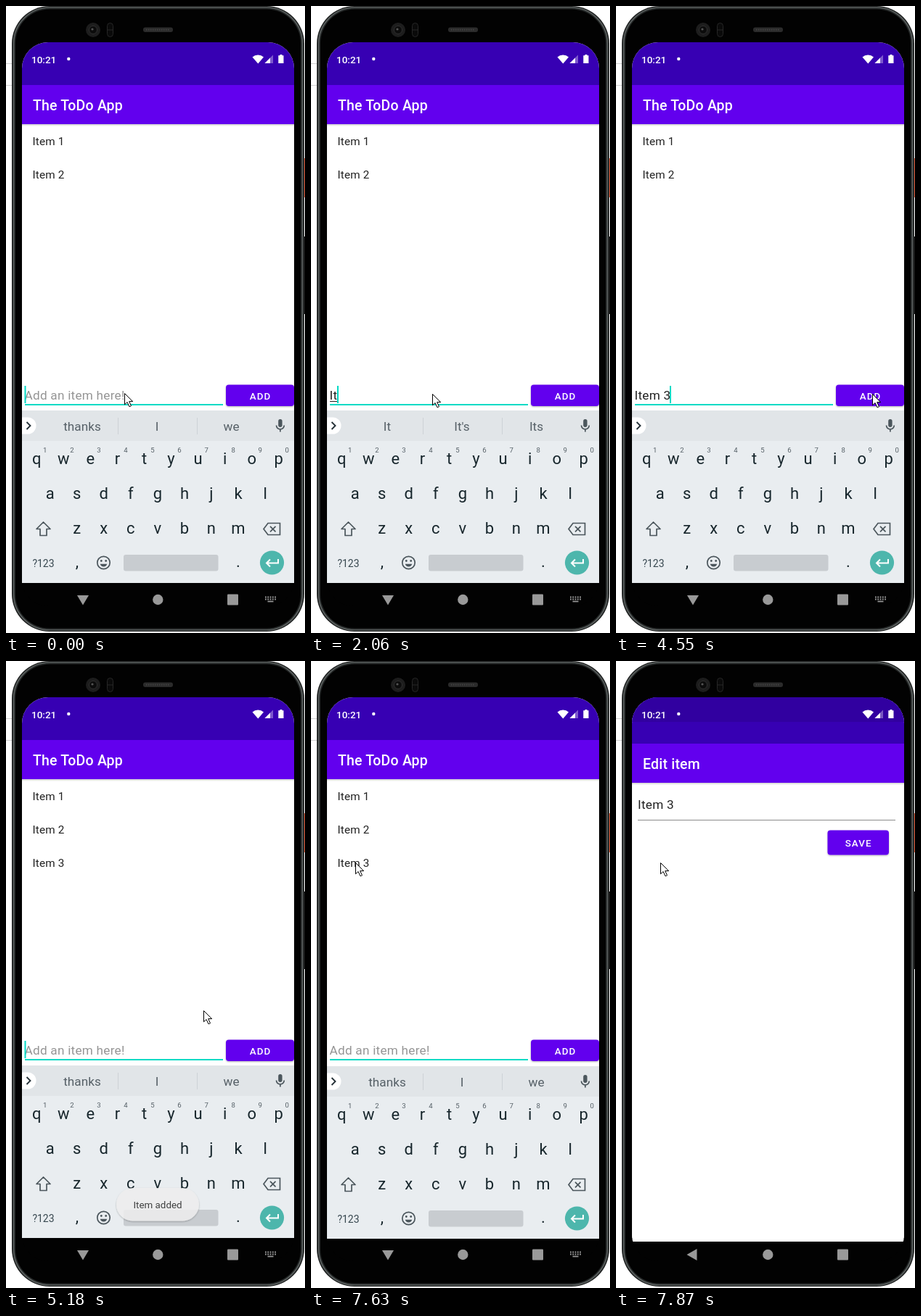
Animation, 412 px wide and 865 px high, one loop 7.99 s. Source, as an HTML page:

```html
<!DOCTYPE html>
<html lang="en">
<head>
<meta charset="utf-8">
<title>The ToDo App</title>
<style>
html, body { margin: 0; width: 100%; height: 100%; overflow: hidden; background: #fff; }
svg { display: block; width: 412px; height: 865px; font-family: Roboto, "Open Sans", sans-serif; }
text { white-space: pre; }
.mid { text-anchor: middle; }
.title { font-size: 19.5px; font-weight: 500; letter-spacing: .2px; fill: #fff; }
.item { font-size: 15.3px; letter-spacing: .15px; fill: #212121; }
.field { font-size: 17.2px; letter-spacing: .24px; fill: #212121; }
.btn { font-size: 13.4px; font-weight: 500; letter-spacing: 1.1px; fill: #fff; text-anchor: middle; }
.word { font-size: 17.2px; fill: #566067; text-anchor: middle; }
.key { font-size: 22px; fill: #17262c; text-anchor: middle; }
.num { font-size: 9.6px; fill: #566067; text-anchor: middle; }
.icon { fill: none; stroke: #4b565c; stroke-width: 1.7; }
</style>
</head>
<body>
<svg viewBox="0 0 412 865">
  <defs>
    <clipPath id="screen"><rect x="22" y="50" width="375" height="778" rx="36"/></clipPath>
    <clipPath id="board"><rect x="22" y="500" width="375" height="297"/></clipPath>
    <linearGradient id="shade" x2="0" y2="1">
      <stop offset="0" stop-color="#000" stop-opacity=".26"/>
      <stop offset="1" stop-color="#000" stop-opacity="0"/>
    </linearGradient>
    <filter id="soft" x="-20%" y="-30%" width="140%" height="170%">
      <feDropShadow dx="0" dy="1" stdDeviation=".8" flood-opacity=".3"/>
    </filter>
  </defs>

  <!-- phone -->
  <path d="M0 79.5H8M0 109.5H8" stroke="#d2d2d2"/>
  <rect x="408" y="210" width="4" height="54" fill="#e8623f"/>
  <rect x="408" y="318" width="4" height="107" fill="#161616"/>
  <rect x="8" y="0" width="403" height="863" rx="52" fill="#1b1d1d"/>
  <rect x="10.500" y="2" width="398" height="859" rx="50" fill="#242727" stroke="#5a5f5e" stroke-width="1.700"/>
  <rect x="13" y="4.500" width="393" height="854" rx="47" fill="#020202"/>
  <circle cx="120" cy="33" r="10" fill="#1d1d1d"/>
  <circle cx="120" cy="33" r="5.5" fill="#0c0c0c" stroke="#303030"/>
  <circle cx="119" cy="32" r="1.6" fill="#555"/>
  <rect x="139.500" y="23.500" width="8" height="19" rx="4" fill="#0a0a0a" stroke="#262626"/>
  <path d="M140 33h7" stroke="#262626"/>
  <rect x="189" y="29.500" width="41" height="6.500" rx="3" fill="#2b2b2b"/>
  <path d="M193 32.700h33" stroke="#414141" stroke-width="2" stroke-dasharray="1.500 1.500"/>

  <g clip-path="url(#screen)">
    <rect x="22" y="50" width="375" height="746" fill="#fff"/>
    <rect x="22" y="50" width="375" height="60" fill="#3700b3"/>
    <rect x="22" y="162" width="375" height="4" fill="url(#shade)"/>
    <rect x="22" y="109" width="375" height="54" fill="#6200ee"/>
    <text class="title" x="37" y="143.500">The ToDo App</text>
    <text class="item" x="36.500" y="191.500">Item 1</text>
    <text class="item" x="36.500" y="237.500">Item 2</text>
    <text class="item" x="36.500" y="283.500" id="third">Item 3</text>

    <text class="field" id="typed" x="25.500" y="543"></text>
    <rect id="compose" x="26" y="545" height="1" fill="#212121"/>
    <rect x="26" y="549" width="273" height="2" fill="#03dac5"/>
    <rect id="caret" y="524" width="2" height="24" fill="#03dac5"/>
    <rect id="add" x="303" y="522.500" width="94" height="29.500" rx="4" filter="url(#soft)"/>
    <text class="btn" x="350.600" y="542.700">ADD</text>
  </g>

  <g clip-path="url(#board)">
    <g id="keyboard">
      <rect x="22" y="558" width="375" height="238" fill="#e9edf0"/>
      <rect x="22" y="558" width="375" height="42" fill="#e1e5e8"/>
      <rect x="10" y="567.500" width="31.500" height="23" rx="11.500" fill="#fff"/>
      <path d="M28.500 574l5 5-5 5" fill="none" stroke="#263238" stroke-width="1.900"/>
      <g id="words">
        <path d="M154.500 568v23M263.500 568v23" stroke="#cdd2d6"/>
        <text class="word" x="105" y="586"></text>
        <text class="word" x="208" y="586"></text>
        <text class="word" x="310.500" y="586"></text>
      </g>
      <rect x="375.200" y="570" width="5.400" height="11" rx="2.700" fill="#4b565c"/>
      <path class="icon" d="M372.500 578.500a5.400 5.400 0 0 0 10.800 0M377.900 584v3.500"/>
      <g id="keys"></g>
      <path class="icon" d="M51.500 712l-9.500 9.500h5v9h9v-9h5z" stroke-linejoin="round"/>
      <path class="icon" d="M361 713.500h16.500v16H361l-6-8zM364 717.800l7.500 7.500m0-7.500l-7.500 7.500"/>
      <text x="51.500" y="773.500" class="mid" font-size="14" fill="#37474f">?123</text>
      <circle class="icon" cx="134.500" cy="768" r="8.700"/>
      <path d="M129.700 769.800h9.600a5 5 0 0 1-9.600 0z" fill="#4b565c"/>
      <circle cx="131.300" cy="765.500" r="1.400" fill="#4b565c"/>
      <circle cx="137.700" cy="765.500" r="1.400" fill="#4b565c"/>
      <rect x="162" y="757" width="130.500" height="22.500" rx="3" fill="#c8ccd0"/>
      <circle cx="366.500" cy="768" r="16.600" fill="#4db6ac"/>
      <path d="M375 763v5.500H359m5-5l-5 5 5 5" fill="none" stroke="#fff" stroke-width="2"/>
    </g>
    <g id="toast">
      <rect x="152" y="727" width="114" height="45.500" rx="22.700" fill="#eee" filter="url(#soft)"/>
      <text class="mid" x="209" y="755" font-size="13.400" fill="#222">Item added</text>
    </g>
  </g>

  <g clip-path="url(#screen)">
    <rect id="floor" x="22" y="796" width="375" height="60" fill="#020202"/>
    <g id="edit">
      <rect x="22" y="50" width="375" height="746" fill="#fff"/>
      <rect x="22" y="40" width="375" height="70" fill="#3700b3"/>
      <rect x="22" y="40" width="375" height="39" fill="#3100a0"/>
      <rect x="22" y="162" width="375" height="4" fill="url(#shade)"/>
      <rect x="22" y="109" width="375" height="54" fill="#6200ee"/>
      <text class="title" x="37" y="144">Edit item</text>
      <text class="field" x="30" y="199">Item 3</text>
      <path d="M30 214.500H385" stroke="#8c8c8c"/>
      <rect x="291.500" y="228.500" width="84.500" height="34" rx="4" fill="#6200ee" filter="url(#soft)"/>
      <text class="btn" x="334.200" y="250.700">SAVE</text>
    </g>
    <text x="35" y="78.500" font-size="13.500" font-weight="500" fill="#fff">10:21</text>
    <circle cx="86.300" cy="73" r="2.200" fill="#fff"/>
    <path d="M339.500 70.500a11.500 11.500 0 0 1 15.500 0l-7.700 9z" fill="#fff"/>
    <path d="M368 67.500v11.500h-11.500z" fill="#fff" opacity=".35"/>
    <path d="M364 71.500v7.500h-7.500z" fill="#fff"/>
    <path d="M377.500 67h3v1.300h2V79h-7.200V68.300h2.200z" fill="#fff"/>
  </g>

  <g fill="#999">
    <path id="down" d="M98 813h16l-8 13.500z"/>
    <path id="back" d="M97.500 819l14-8v16z"/>
    <circle cx="209.300" cy="819" r="7.200"/>
    <rect x="305" y="811.500" width="15" height="15" rx="1"/>
    <g id="switch">
      <path d="M357 815.500h15M357 818.500h15" stroke="#999" stroke-width="2" stroke-dasharray="1.800 1.500"/>
      <path d="M360.500 821.500h8" stroke="#999" stroke-width="1.700"/>
    </g>
  </g>
  <path id="mouse" d="M.5.500v15.300l3.600-3.300 2.900 6.300 2.500-1.100-2.800-6.100h5z" fill="#fff" stroke="#000"/>
</svg>
<script>
const LOOP = 7990;
const $ = id => document.getElementById(id);
const words = [...document.querySelectorAll('#words text')];
const HINT = 'Add an item here!';
const IDLE = ['thanks', 'I', 'we'];

// Each track is a list of [time, value], held until the next entry.
const mouse = [
  [0, [163, 534]], [870, [164, 534]], [1020, [166, 535]], [1140, [167, 535]],
  [3700, [192, 548]], [3820, [240, 564]], [3940, [298, 571]], [4060, [341, 550]], [4180, [353, 535]],
  [4910, [340, 533]], [5030, [282, 513]], [5180, [272, 482]], [5300, [267, 466]], [5430, [266, 459]],
  [6660, [88, 370]], [6790, [84, 356]], [6950, [65, 298]], [7240, [61, 278]]
];
// text, caret x, composing, suggestions
const typing = [
  [0, ['', 25.5, false, IDLE]],
  [1760, ['I', 30, true, ['I', "I'm", "I'll"]]],
  [2060, ['It', 36, true, ['It', "It's", 'Its']]],
  [2210, ['Ite', 45, true, ['Item', 'Ite', 'Items']]],
  [2340, ['Item', 60, true, ['Item', 'Items', 'Itemized']]],
  [2960, ['Item ', 64.5, false, ['and', 'is', 'I']]],
  [3580, ['Item 3', 74, false, null]],
  [4790, ['', 25.5, false, IDLE]]
];
const caret = [
  [0, 1], [250, 0], [750, 1], [1140, 0], [1640, 1], [3460, 0], [3580, 1], [4060, 0], [4550, 1],
  [5300, 0], [5710, 1], [6210, 0], [6790, 1], [7100, 0]
];
const toast = [
  [0, 0], [4910, .3], [5030, .65], [5180, .85], [5300, .95], [5430, 1],
  [6790, .7], [6950, .35], [7100, .06], [7240, 0]
];
const press = [[0, '#6200ee'], [4670, '#7c2bf1'], [4910, '#6f18ef'], [5030, '#6200ee']];
// keyboard drop, edit screen offset, edit screen opacity
const swap = [[0, [0, 0, 0]], [7630, [1, 0, 0]], [7750, [24, 26, .6]], [7870, [238, 5, 1]]];

function at(track, t) {
  let value = track[0][1];
  for (const [start, v] of track) if (t >= start) value = v;
  return value;
}

function set(id, attrs) {
  for (const name in attrs) $(id).setAttribute(name, attrs[name]);
}

const show = (id, on) => set(id, { opacity: +on });
const move = (id, x, y) => set(id, { transform: `translate(${x} ${y})` });

function buildKeys() {
  const key = (c, x, y, kind = 'key') => `<text class="${kind}" x="${x}" y="${y}">${c}</text>`;
  const row = (chars, x, y, kind) => [...chars].map((c, i) => key(c, x + i * 37.05, y, kind)).join('');
  $('keys').innerHTML = row('qwertyuiop', 42.3, 631.5) + row('1234567890', 53.8, 616, 'num') +
    row('asdfghjkl', 60.7, 679.5) + row('zxcvbnm', 97.7, 727.5) +
    key(',', 98, 774) + key('.', 320, 774);
}

function draw(t) {
  const [text, caretX, composing, tips] = at(typing, t);
  const typed = $('typed');
  typed.textContent = text || HINT;
  typed.style.fill = text ? '#212121' : '#959595';
  set('compose', { width: composing ? caretX - 26 : 0 });
  set('caret', { x: caretX, opacity: at(caret, t) });
  show('words', !!tips);
  if (tips) words.forEach((w, i) => w.textContent = tips[i]);
  show('third', t >= 4790);
  show('toast', at(toast, t));
  set('add', { fill: at(press, t) });

  const [drop, offset, alpha] = at(swap, t);
  const done = alpha === 1;
  move('keyboard', 0, drop);
  show('keyboard', !done);
  move('edit', 0, offset);
  move('floor', 0, done ? offset : Math.min(drop, 1));
  show('edit', alpha);
  show('down', !done);
  show('switch', !done);
  show('back', done);
  move('mouse', ...at(mouse, t));
}

buildKeys();
const begin = performance.now();
function tick(now) {
  draw(Math.max(0, now - begin) % LOOP);
  requestAnimationFrame(tick);
}
draw(0);
requestAnimationFrame(tick);
</script>
</body>
</html>
```
